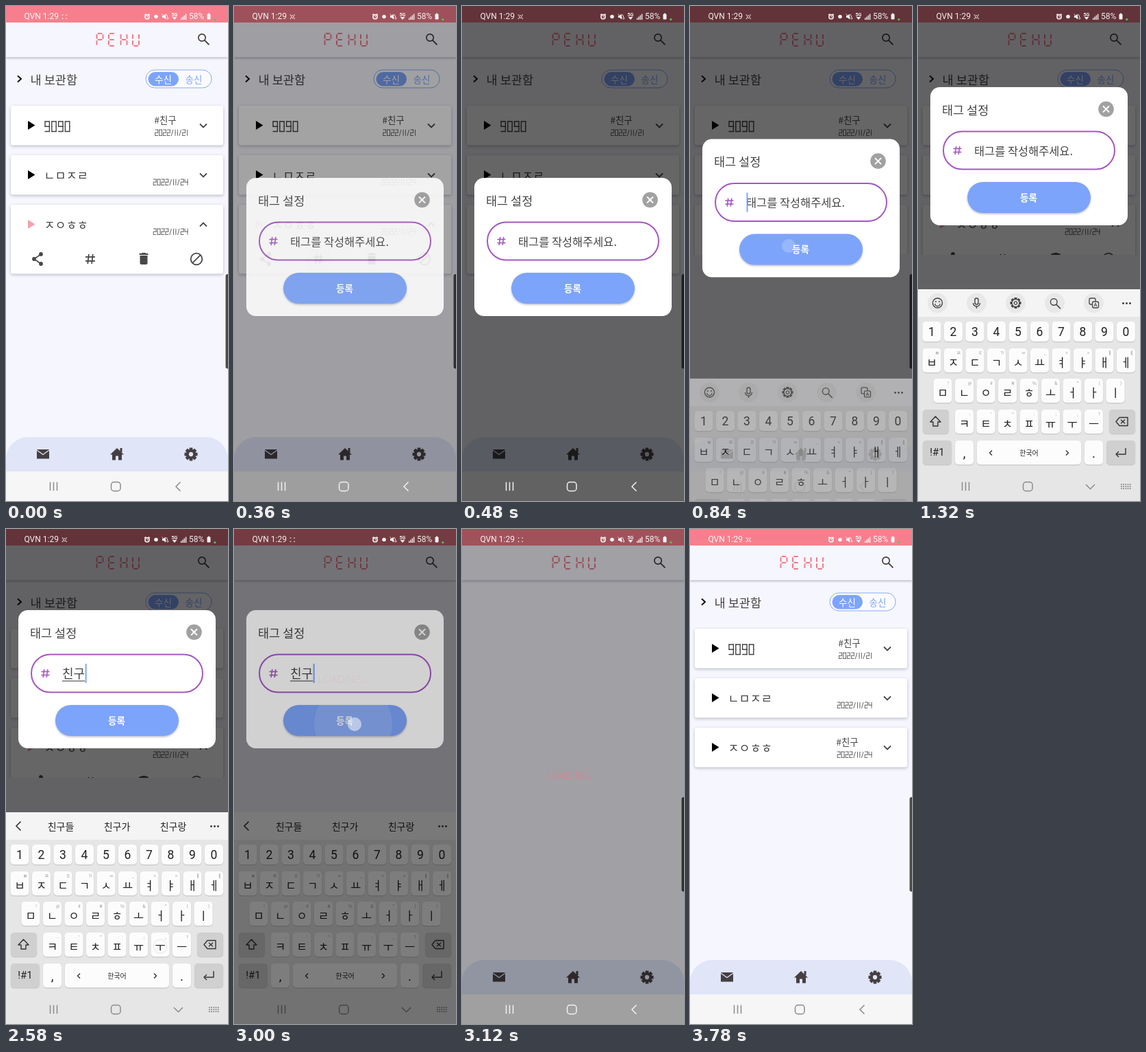
An HTML page with a canvas for the animation above (4020 ms loop, 324 px wide and 720 px high).

```html
<!DOCTYPE html>
<html lang="ko">
<head>
<meta charset="utf-8">
<style>
html, body { margin: 0; width: 100%; height: 100%; overflow: hidden; background: #f6f6fe; }
canvas { display: block; width: 324px; height: 720px; }
</style>
</head>
<body>
<canvas id="stage"></canvas>
<script>
const W = 324, H = 720, LOOP = 4020, STEP = 60;
const BLUE = '#7da4fb', PINK = '#f77f8d', INK = '#453f42', PURPLE = '#a457c0';
const KR = '"Noto Sans CJK KR", "Noto Sans CJK", sans-serif';
const UI = 'Roboto, "Noto Sans CJK KR", sans-serif';
const dpr = window.devicePixelRatio || 1;

function context(canvas) {
  canvas.width = W * dpr;
  canvas.height = H * dpr;
  const ctx = canvas.getContext('2d');
  ctx.scale(dpr, dpr);
  return ctx;
}
const screenCtx = context(document.getElementById('stage'));
const layerCtx = context(document.createElement('canvas'));
let c = screenCtx;

const clamp = v => Math.max(0, Math.min(1, v));
const ramp = (t, a, b) => clamp((t - a) / (b - a));
const easeOut = p => 1 - (1 - p) ** 3;
const between = (t, a, b) => t >= a && t < b;

function rect(x, y, w, h, fill) { c.fillStyle = fill; c.fillRect(x, y, w, h); }
function box(x, y, w, h, r, fill, stroke, lw = 1) {
  c.beginPath();
  c.roundRect(x, y, w, h, r);
  if (fill) { c.fillStyle = fill; c.fill(); }
  if (stroke) { c.strokeStyle = stroke; c.lineWidth = lw; c.stroke(); }
}
function disc(x, y, r, fill) {
  c.beginPath(); c.arc(x, y, r, 0, 7); c.fillStyle = fill; c.fill();
}
function ring(x, y, r, color, lw = 1) {
  c.beginPath(); c.arc(x, y, r, 0, 7); c.strokeStyle = color; c.lineWidth = lw; c.stroke();
}
function poly(pts, color, lw) {
  c.beginPath();
  for (let i = 0; i < pts.length; i += 2) c.lineTo(pts[i], pts[i + 1]);
  if (lw) { c.strokeStyle = color; c.lineWidth = lw; c.stroke(); }
  else { c.fillStyle = color; c.fill(); }
}
function text(s, x, y, size, color, align = 'left', font = KR, weight = 400) {
  c.font = `${weight} ${size}px ${font}`;
  c.textAlign = align;
  c.textBaseline = 'middle';
  c.fillStyle = color;
  c.fillText(s, x, y);
}
function shadow(color, blur, dy) { c.shadowColor = color; c.shadowBlur = blur * dpr; c.shadowOffsetY = dy * dpr; }

// Draws a group as one flat layer, so overlapping parts fade together
function group(alpha, draw) {
  c = layerCtx;
  c.clearRect(0, 0, W, H);
  c.save(); draw(); c.restore();
  c = screenCtx;
  c.save();
  c.globalAlpha = alpha;
  c.drawImage(layerCtx.canvas, 0, 0, W, H);
  c.restore();
}

// Seven-segment lettering: a top, b/c right, d bottom, e/f left, g middle
const SEG = { 0: 'abcdef', 1: 'bc', 2: 'abged', 4: 'fgbc', 9: 'abcdfg', P: 'abefg', E: 'adefg', H: 'bcefg', U: 'bcdef' };
function segChar(ch, x, y, w, h, color, lw, gap) {
  const m = h / 2, ends = {
    a: [0, 0, w, 0], b: [w, 0, w, m], c: [w, m, w, h], d: [0, h, w, h],
    e: [0, m, 0, h], f: [0, 0, 0, m], g: [0, m, w, m]
  };
  c.lineCap = gap ? 'butt' : 'round';
  for (const s of SEG[ch]) {
    const [x0, y0, x1, y1] = ends[s], gx = x0 === x1 ? 0 : gap, gy = gap - gx;
    poly([x + x0 + gx, y + y0 + gy, x + x1 - gx, y + y1 - gy], color, lw);
  }
  c.lineCap = 'butt';
}
const advance = ch => ch === '1' ? 3.4 : ch === '/' ? 4.8 : 5.9;
function date(s, right, y) {
  let x = right - [...s].reduce((n, ch) => n + advance(ch), 0) + 1;
  for (const ch of s) {
    if (ch === '/') poly([x, y + 9, x + 2.6, y], '#555', 0.9);
    else segChar(ch, ch === '1' ? x - 3 : x, y, 3.9, 8.4, '#555', 0.9, 0);
    x += advance(ch);
  }
}

function hash(x, y, r, color, lw) {
  const k = r * 0.42;
  for (const d of [-k, k]) {
    poly([x - r, y + d, x + r, y + d], color, lw);
    poly([x + d + 0.8, y - r, x + d - 0.8, y + r], color, lw);
  }
}
function gear(x, y, r, color, hole, inner = 0.33) {
  c.save(); c.translate(x, y);
  for (let i = 0; i < 4; i++) { rect(-r * 0.25, -r, r * 0.5, r * 2, color); c.rotate(Math.PI / 4); }
  c.restore();
  disc(x, y, r * 0.76, color);
  disc(x, y, r * inner, hole);
}
function magnifier(x, y, r, color, lw) {
  ring(x, y, r, color, lw);
  poly([x + r * 0.7, y + r * 0.7, x + r * 2, y + r * 2], color, lw * 1.15);
}
function chevron(x, y, dir) { poly([x - 5, y - 2.5 * dir, x, y + 2.5 * dir, x + 5, y - 2.5 * dir], '#484848', 1.8); }

function cardActions() {
  const y = 368, ink = '#484848';
  poly([51, 361, 41, 368, 51, 375], ink, 1.6);
  disc(51, 361, 2.9, ink); disc(41, 368, 2.9, ink); disc(51, 375, 2.9, ink);
  hash(123, y, 7, ink, 1.8);
  rect(194.5, 360, 13, 2, ink); rect(198, 359, 6, 2, ink);
  box(195.5, 363, 11, 13, [0, 0, 2, 2], ink);
  ring(278, y, 8.3, ink, 1.8);
  poly([272.4, 373.6, 283.6, 362.4], ink, 1.8);
}
function card(i, label, day, tagged, open) {
  const y = 145 + 72 * i;
  c.save();
  shadow('rgba(60,60,80,.32)', 4, 1.5);
  box(7, y, 310, open ? 100.5 : 57.5, 3, '#fff');
  c.restore();
  poly([32, y + 22, 42.5, y + 28.5, 32, y + 35], open ? '#f5a0ae' : '#000');
  if (label === '9090') [...label].forEach((ch, k) => segChar(ch, 57 + k * 9.8, y + 23, 6.4, 14.5, '#444', 1.4, 0));
  else text(label, 55.5, y + 29.5, 17.5, '#444');
  const short = day.endsWith('1');
  if (tagged) text('#친구', short ? 216.5 : 213.5, y + 21, 13.4, '#444');
  date(day, 266, y + 35);
  chevron(288, y + 29, open ? -1 : 1);
}
function bottomNav() {
  box(0, 627, W, 50, [32, 32, 0, 0], '#e0e5f8');
  rect(45, 645, 18, 13.5, INK);
  poly([45, 646, 54, 652.5, 63, 646], '#e0e5f8', 1.3);
  poly([152, 652.5, 162, 643, 172, 652.5, 169, 652.5, 169, 660.5, 164, 660.5, 164, 654.5, 160, 654.5, 160, 660.5, 155, 660.5, 155, 652.5], INK);
  rect(166.5, 643, 3, 6, INK);
  gear(270, 652, 9.5, INK, '#e0e5f8');
}
function systemNav(color, keyboard) {
  for (const x of [64.5, 69.5, 74.5]) poly([x, 692.5, x, 705], color, 1.5);
  box(153.5, 692.5, 13.5, 13, 4, null, color, 1.5);
  if (!keyboard) return poly([254.5, 692.5, 248, 699, 254.5, 705.5], color, 1.5);
  poly([245, 696, 251.5, 702.5, 258, 696], color, 1.5);
  for (let i = 0; i < 15; i++) rect(296 + i % 5 * 3.2, 695 + Math.floor(i / 5) * 3, 1.8, 1.8, color);
}
const covered = t => between(t, 960, 3120);

function page(t) {
  const resized = between(t, 780, 3120), done = t >= 3120;
  rect(0, 0, W, H, '#f6f6fe');
  if (!between(t, 2940, 3180)) {
    c.save();
    c.beginPath(); c.rect(0, 24, W, resized ? 338 : 603); c.clip();
    poly([17, 101.5, 22, 106, 17, 110.5], '#111', 2);
    text('내 보관함', 35.5, 107, 17.6, '#444');
    box(204, 93, 96, 26, 13, '#fbfbff', '#8aaaf2', 1);
    box(207.5, 96, 44.5, 20.5, 10.2, BLUE);
    text('수신', 229.5, 106.5, 13.5, '#fff', 'center');
    text('송신', 274, 106.5, 13.5, BLUE, 'center');
    card(0, '9090', '2022/11/21', true, false);
    card(1, 'ㄴㅁㅈㄹ', '2022/11/24', false, false);
    card(2, 'ㅈㅇㅎㅎ', '2022/11/24', done, !done);
    if (!done) {
      if (between(t, 60, 480)) box(105, 350, 36, 36, 12, `rgba(0,0,0,${0.12 * (1 - ramp(t, 300, 480))})`);
      cardActions();
    }
    c.restore();
  }
  c.save();
  shadow('rgba(60,60,80,.35)', 3, 1);
  rect(0, 24, W, 50.5, '#f6f6fe');
  c.restore();
  rect(0, 0, W, 24, PINK);
  [...'PEHU'].forEach((ch, i) => segChar(ch, 132.5 + i * 17.5, 40, 9, 18, '#ef7c89', 2, 1.2));
  magnifier(286, 46, 5.2, INK, 1.7);
  if (!covered(t)) {
    bottomNav();
    rect(0, 677, W, 43, '#f6f6f6');
    box(320.5, 390, 6, 137.5, 3, '#4a4a4c');
  }
}

function statusBar(t) {
  const ink = 'rgba(255,255,255,.92)';
  text('QVN 1:29', 26.5, 15.5, 12, ink, 'left', UI);
  for (const x of [81.8, 87.4]) for (const y of [12.4, 17.6]) rect(x, y, 1.4, 1.4, ink);
  const scan = between(t, 300, 1380) || between(t, 2400, 2940) || t >= 3720;
  if (scan || t >= 3420) ring(85.3, 15.7, 1.8, scan ? ink : 'rgba(255,255,255,.5)', 1);
  ring(206, 15.7, 3.1, ink, 1.6); poly([206, 13.8, 206, 16, 207.5, 16], ink, 1);
  poly([202, 13, 204, 11.4], ink, 1.2); poly([208, 11.4, 210, 13], ink, 1.2);
  disc(219, 15.5, 2.8, ink);
  poly([228, 14, 230, 14, 233, 11.5, 233, 19.5, 230, 17, 228, 17], ink);
  poly([234, 12, 237, 19], ink, 1); poly([227.5, 11.5, 236, 19.5], ink, 0.9);
  text('5G', 246, 12.5, 7, ink, 'center', UI, 700);
  poly([242.5, 16, 249.5, 16, 246, 20], ink);
  for (let i = 0; i < 4; i++) rect(255 + i * 2.3, 17.5 - i * 2, 1.4, 2.5 + i * 2, ink);
  text('58%', 267, 15.5, 12, ink, 'left', UI);
  box(293.5, 11.5, 5, 8, 1, ink); rect(295, 10.5, 2, 1.2, ink);
  disc(304.8, 19.5, 1.5, '#4fcf58');
}

const ROWS = [
  { keys: '1234567890', hints: '', x: 20, y: 459, h: 29 },
  { keys: 'ㅂㅈㄷㄱㅅㅛㅕㅑㅐㅔ', hints: 'ㅃㅉㄸㄲㅆ_<>ㅒㅖ', x: 20, y: 498, h: 35 },
  { keys: 'ㅁㄴㅇㄹㅎㅗㅓㅏㅣ', hints: '!@#₩%&*()', x: 36, y: 542, h: 35 },
  { keys: 'ㅋㅌㅊㅍㅠㅜㅡ', hints: '-\'":;,?', x: 67.5, y: 587, h: 35 }
];
// key, time down, time up
const TAPS = [['ㅊ', 1620, 1740], ['ㅣ', 1860, 1980], ['ㄴ', 2040, 2100], ['ㄱ', 2220, 2340], ['ㅜ', 2400, 2520]];
const TYPED = [[1740, 'ㅊ'], [1980, '치'], [2100, '친'], [2340, '친ㄱ'], [2460, '친구']];
const typedAt = t => TYPED.reduce((s, [at, v]) => t >= at ? v : s, '');
const keyX = (row, i) => row.x + i * 31.5;

function toolbar() {
  const y = 432, ink = '#444', pale = '#e8e8e8';
  for (const x of [28.5, 85.5, 142.5, 199.5, 256.5]) disc(x, y, 14.5, pale);
  ring(28.5, y, 7, ink, 1.4);
  disc(26, 430, 1, ink); disc(31, 430, 1, ink);
  c.beginPath(); c.arc(28.5, 433, 3.6, 0, Math.PI); c.strokeStyle = ink; c.lineWidth = 1.3; c.stroke();
  box(83, 425, 5, 9, 2.5, null, ink, 1.4);
  c.beginPath(); c.arc(85.5, 432, 5, 0, Math.PI); c.stroke();
  poly([85.5, 437, 85.5, 440], ink, 1.4);
  gear(142.5, y, 8, ink, pale, 0.6);
  ring(142.5, y, 2.2, ink, 1.2);
  magnifier(198.2, 430.5, 4.8, ink, 1.4);
  box(250, 425, 9, 9, 2, null, ink, 1.3);
  box(254.5, 430, 9, 9, 2, pale, ink, 1.3);
  text('A', 259, 435, 8, ink, 'center', UI, 500);
}
function suggestions(word) {
  poly([21.5, 425.5, 15, 432, 21.5, 438.5], '#333', 1.6);
  const list = word === '친구' ? ['친구들', '친구가', '친구랑'] : [word, word + '가', word + '는'];
  list.forEach((s, i) => text(s, 80 + i * 82, 432.5, 14, '#222', 'center'));
}
function key(x, y, w, h, fill = '#fcfcfc') {
  c.save();
  shadow('rgba(0,0,0,.16)', 1.5, 1);
  box(x, y, w, h, 5, fill);
  c.restore();
}
function keyboard(t) {
  rect(0, 412, W, 308, '#e6e6e6');
  rect(0, 412, W, 40, '#f4f4f4');
  if (t >= 2040) suggestions(typedAt(t)); else toolbar();
  for (const x of [299.5, 304.5, 309.5]) disc(x, 432.5, 1.4, '#333');
  ROWS.forEach((row, r) => [...row.keys].forEach((ch, i) => {
    const x = keyX(row, i);
    const down = TAPS.some(([k, a, b]) => k === ch && between(t, a, b));
    key(x - 13.5, row.y, 27, row.h, down ? '#a2a2a2' : '#fcfcfc');
    text(ch, x, row.y + (r ? 21 : 15.5), r ? 16.5 : 17.5, '#222', 'center', r ? KR : UI);
    if (r) text(row.hints[i], x + 8, row.y + 6.5, 6.5, '#999', 'center', KR);
  }));
  const grey = '#d0d0d0', ink = '#333';
  key(7, 587, 38, 35, grey); key(279, 587, 38, 35, grey);
  key(7, 632, 42, 35, grey); key(275, 632, 42, 35, grey);
  key(54, 632, 27, 35); key(86, 632, 152, 35); key(243, 632, 27, 35);
  c.lineJoin = 'round';
  poly([25.5, 597, 33, 605, 29, 605, 29, 611, 22, 611, 22, 605, 18, 605, 25.5, 597, 33, 605], ink, 1.4);
  poly([289, 604.5, 294, 598.5, 306, 598.5, 306, 610.5, 294, 610.5, 289, 604.5, 294, 598.5], ink, 1.4);
  poly([296, 601.8, 302, 607.2], ink, 1.4); poly([302, 601.8, 296, 607.2], ink, 1.4);
  poly([303, 643, 303, 652, 289, 652], ink, 1.4); poly([293, 648, 289, 652, 293, 656], ink, 1.4);
  text('!#1', 28, 650, 15, '#222', 'center', UI);
  text(',', 67.5, 651, 19, '#222', 'center', UI);
  text('.', 256.5, 651, 19, '#222', 'center', UI);
  text('한국어', 162, 650, 10, '#222', 'center');
  poly([108, 646.5, 104.5, 650, 108, 653.5], ink, 1.4);
  poly([216, 646.5, 219.5, 650, 216, 653.5], ink, 1.4);
  systemNav('#8b8b8b', true);
  taps(t);
}
function taps(t) {
  for (const [ch, a, b] of TAPS) {
    if (!between(t, a, b + 240)) continue;
    const row = ROWS.find(r => r.keys.includes(ch));
    const x = keyX(row, row.keys.indexOf(ch));
    if (t < b) {
      c.save();
      shadow('rgba(0,0,0,.25)', 4, 1);
      box(x - 24.5, row.y - 68, 49, 62, 8, '#fafafa');
      c.restore();
      text(ch, x, row.y - 37, 31, '#222', 'center');
      disc(x + 1, row.y + 26, 9.5, 'rgba(240,240,245,.65)');
    } else ring(x, row.y + 20, 10, `rgba(120,120,120,${0.22 * (1 - ramp(t, b, b + 240))})`, 1);
  }
}

function modal(t, y, shade) {
  box(18, y, 288, 201, 14, '#fff');
  text('태그 설정', 35, y + 33, 17.5, '#444');
  disc(274.5, y + 32, 11.3, '#a1a1a1');
  poly([270, y + 27.5, 279, y + 36.5], '#fff', 2);
  poly([279, y + 27.5, 270, y + 36.5], '#fff', 2);
  box(37, y + 64.5, 250, 55, 27.5, null, PURPLE, 2);
  hash(57.5, y + 92, 6, PURPLE, 1.6);
  const word = typedAt(t);
  if (word) text(word, 82, y + 92.5, 18, '#444');
  else text('태그를 작성해주세요.', 82, y + 92.5, 16.4, '#444');
  const wide = word ? c.measureText(word).width : 0;
  if (word) rect(82, y + 102.5, wide, 1.2, '#555');
  if (t >= 780 && !between(t, 1320, 1620)) rect(82.5 + wide, y + 78, 2, 28, BLUE);
  c.save();
  shadow('rgba(50,60,100,.35)', 3, 1.5);
  box(72, y + 138, 180, 45, 22.5, BLUE);
  c.restore();
  if (t >= 2820) {
    c.save();
    c.beginPath(); c.roundRect(72, y + 138, 180, 45, 22.5); c.clip();
    disc(174, y + 166, 8 + 49 * ramp(t, 2820, 3000), 'rgba(255,255,255,.13)');
    c.restore();
  }
  text('등록', 161.5, y + 160.5, 13.5, '#fff', 'center', KR, 700);
  if (shade) box(18, y, 288, 201, 14, `rgba(0,0,0,${shade})`);
}
function touch(t, x, y, a, b, strength) {
  if (between(t, a, b)) disc(x, y, 10, `rgba(255,255,255,${strength * (1 - ramp(t, b - 120, b) * 0.6)})`);
}

function draw(t) {
  c.lineJoin = 'miter';
  page(t);
  const leave = ramp(t, 2880, 3000), hide = ramp(t, 3000, 3120);
  const dim = t < 3000 ? 0.6 * ramp(t, 180, 480) - 0.07 * leave : 0.53 * (1 - ramp(t, 3060, 3240));
  rect(0, 0, W, H, `rgba(0,0,0,${dim})`);
  statusBar(t);
  if (!covered(t)) systemNav(between(t, 780, 960) ? '#444' : dim > 0.1 ? '#f2f2f2' : '#8b8b8b', false);

  if (between(t, 720, 3120)) group(ramp(t, 720, 940) * (1 - hide), () => {
    c.translate(0, 308 * (1 - easeOut(ramp(t, 760, 1080))) + 308 * hide * hide);
    keyboard(t);
    if (leave) rect(0, 412, W, 308, `rgba(0,0,0,${0.5 * leave})`);
  });

  const show = ramp(t, 180, 385) * (1 - hide);
  if (show > 0) group(show, () => modal(t, 250 - 132 * easeOut(ramp(t, 791, 1080)), 0.18 * leave));

  if (between(t, 2940, 3240)) group(ramp(t, 2970, 3120) * (1 - ramp(t, 3120, 3240)), () =>
    text('LOADING...', 160, 220 + 140 * hide, 15, '#f5788c', 'center', '"Open Sans", sans-serif', 300));

  touch(t, 125, 370, 60, 240, 0.5);
  touch(t, 144, 349, 720, 960, 0.2);
  touch(t, 176, 284, 2820, 3120, 0.5);
}

function frame(now) {
  draw(Math.floor(now % LOOP / STEP) * STEP);
  requestAnimationFrame(frame);
}
draw(0);
requestAnimationFrame(frame);
</script>
</body>
</html>
```
